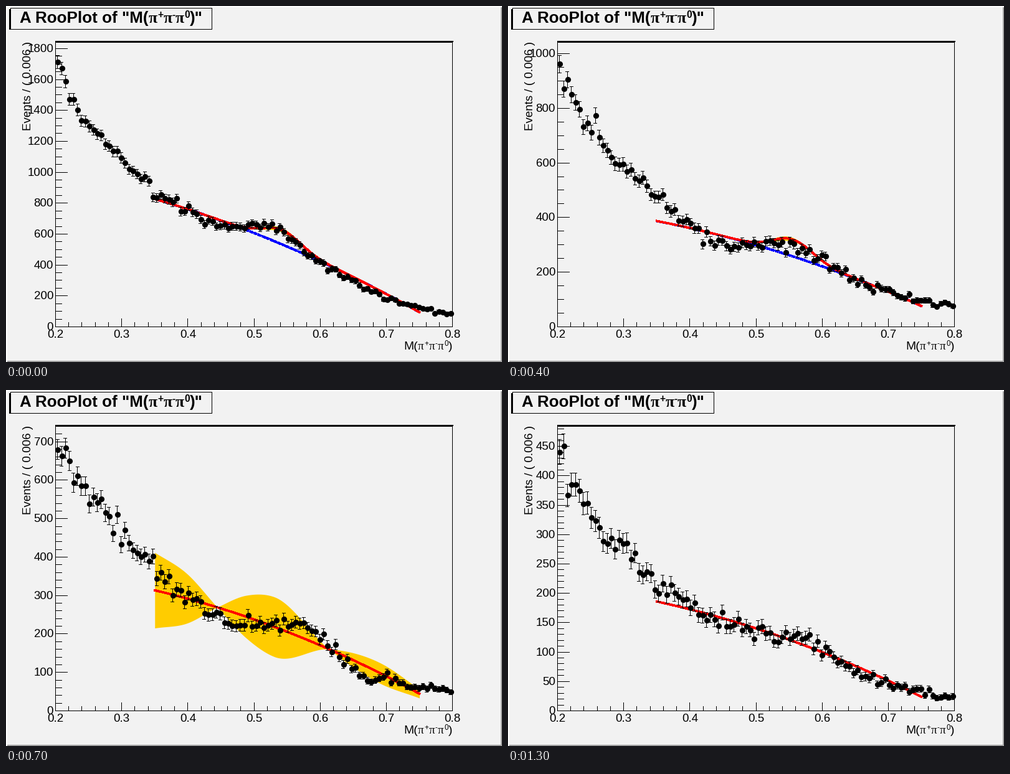
A matplotlib script for the animation above (1600 ms loop, 796 by 572 pixels).

```python
import matplotlib.pyplot as plt
import numpy as np
from matplotlib.animation import FuncAnimation
from matplotlib.patches import Rectangle

W, H, DPI = 796, 572, 128
PX = 72 / DPI
LEFT, RIGHT, TOP, BOTTOM = 79.5, 716.5, 57, 514.5
BG = "#f2f2f2"
FIT_LO, FIT_HI = 0.35, 0.75
BINS = np.arange(100)
KEY_BINS = [0, 5, 12, 22, 35, 45, 55, 65, 75, 85, 99]

fig = plt.figure(figsize=(W / DPI, H / DPI), dpi=DPI, facecolor=BG)
ax = fig.add_axes([0, 0, 1, 1])
ax.set(xlim=(0, W), ylim=(H, 0))
ax.axis("off")


def px(x):
    return LEFT + (x - 0.2) / 0.6 * (RIGHT - LEFT)


def rect(x0, y0, x1, y1, color):
    ax.add_patch(Rectangle((x0, y0), x1 - x0, y1 - y0, fc=color, lw=0,
                           antialiased=False))


def line(x, y, width, color="black", z=2, **kw):
    return ax.plot(x, y, color=color, lw=width * PX, zorder=z,
                   antialiased=False, **kw)[0]


def hair(x, y):
    """One-pixel line; the half pixel offsets the renderer's snapping."""
    return line(np.array(x) - 0.5, np.array(y) + 0.5, 1)


def box(x0, y0, x1, y1):
    hair([x0, x1, x1, x0, x0], [y0, y0, y1, y1, y0])


def label(x, y, s, size=18.8, font="Liberation Sans", **kw):
    return ax.text(x, y, s, fontsize=size * PX, family=font, va="baseline",
                   zorder=3, **kw)


def formula(x, y, size, weight="normal"):
    """Write the three pi symbols with their charges; return the end x."""
    for charge, adv in (("+", 0.584), ("-", 0.333), ("0", 0.556)):
        label(x, y, "π", size, "Liberation Serif", weight=weight)
        x += 0.549 * size
        label(x, y - 0.32 * size, charge, 0.6 * size, weight=weight)
        x += adv * 0.6 * size
    return x


def smooth(x, xs, ys):
    """Cubic Hermite curve through a few key points."""
    xs, ys = np.array(xs, float), np.array(ys, float)
    m = np.gradient(ys, xs)
    j = np.clip(np.searchsorted(xs, x) - 1, 0, len(xs) - 2)
    h = xs[j + 1] - xs[j]
    t = (x - xs[j]) / h
    return ((1 + 2 * t) * (1 - t) ** 2 * ys[j] + t * (1 - t) ** 2 * h * m[j]
            + t * t * (3 - 2 * t) * ys[j + 1] + t * t * (t - 1) * h * m[j + 1])


def draw_stage():
    rect(0, 0, W, 2, "white")
    rect(0, 0, 2, H, "white")
    rect(W - 2, 2, W, H, "#a0a0a0")
    rect(2, H - 2, W, H, "#a0a0a0")

    rect(5, 5, 327, 38, "black")
    rect(7, 2, 331, 37, BG)
    box(7.5, 2.5, 330.5, 36.5)
    label(22, 27, 'A RooPlot of "M(', 26, weight="bold")
    end = formula(229, 27, 26, "bold")
    label(end, 27, ')"', 26, weight="bold")

    box(LEFT, TOP, RIGHT, BOTTOM)
    line([LEFT, RIGHT], [TOP, TOP], 2)
    for i in range(31):
        x = px(0.2 + 0.02 * i)
        hair([x, x], [BOTTOM, BOTTOM - (7 if i % 5 else 13.5)])
        if i % 5 == 0:
            label(x, 533, f"{0.2 + 0.02 * i:.1f}", ha="center")

    label(40, 200, "Events / ( 0.006 )", rotation=90, rotation_mode="anchor")
    label(638.5, 552, "M(", 19.3)
    end = formula(638.5 + 1.166 * 19.3, 552, 19.3)
    label(end, 552, ")", 19.3)


def draw_counts(step, sub, top, py):
    art = []
    for j in range(int(top * sub / step) + 1):
        v = j * step / sub
        major = j % sub == 0
        art.append(hair([LEFT, LEFT + (19 if major else 9.5)], [py(v)] * 2))
        if major:
            art.append(label(76, py(v) + 6.5, f"{v:.0f}", ha="right"))
    return art


def draw_fit(py, bkg, peak, band):
    art = []
    t = np.linspace(0, 1, 260)
    x = px(FIT_LO + (FIT_HI - FIT_LO) * t)
    base = bkg[0] - bkg[1] * t - bkg[2] * t * t
    total = base
    if peak:
        height, mid, sigma = peak
        total = base + height * np.exp(-((x - mid) / sigma) ** 2 / 2)
        art.append(line(x, py(base), 2.6, "blue", 3.5, dashes=(2, 0.6),
                        dash_capstyle="butt"))
    if band:
        w = smooth(x, *zip(*band))
        art.append(ax.fill_between(x, py(total) - w, py(total) + w,
                                   color="#ffcc00", lw=0, zorder=2.5,
                                   antialiased=False))
    art.append(line(x, py(total), 2.8, "red", 4))
    return art


def draw_data(py, n, root):
    x = px(0.203 + 0.006 * BINS)
    hi, lo = py(n + root + 0.5) + 0.5, py(n - root + 0.5) + 0.5
    style = dict(color="black", lw=PX, zorder=5, antialiased=False)
    art = [ax.vlines(x - 0.5, hi, lo, **style)]
    art += [ax.hlines(y, x - 3, x + 2, **style) for y in (hi, lo)]
    dots = line(np.floor(x) + 0.5, np.floor(py(n)) + 0.5, 0, z=6, ls="",
                marker="o", ms=9.2 * PX, mew=0)
    dots.set_snap(False)
    return art + [dots]


def scene(seed, step, sub, counts, bkg, peak=None, band=None):
    """Build one histogram with its fit.

    counts: mean events at KEY_BINS; bkg: quadratic background;
    peak: signal height, centre and width; band: (x, half width) points of
    the error band, which changes sign where its edges cross.
    """
    rng = np.random.default_rng(seed)
    mean = smooth(BINS, KEY_BINS, counts)
    n = np.round(mean + 0.75 * np.sqrt(mean) * rng.normal(size=len(BINS)))
    n[0] = counts[0]
    root = np.sqrt(n + 0.25)
    top = 1.05 * (n[0] + root[0] + 0.5)

    def py(v):
        return BOTTOM - v * (BOTTOM - TOP) / top

    return (draw_counts(step, sub, top, py) + draw_fit(py, bkg, peak, band)
            + draw_data(py, n, root))


draw_stage()
scenes = [
    scene(1, 200, 4,
          [1712, 1390, 1200, 940, 715, 648, 640, 435, 285, 165, 83],
          (823, 499, 233), (93, 443, 30),
          [(238, 1), (400, 1.5), (440, 3.5), (480, 1.5), (664, 1)]),
    scene(2, 200, 4,
          [1257, 1045, 865, 662, 490, 437, 437, 350, 230, 160, 100],
          (537, 257, 172), (44.5, 462, 62),
          [(238, 1), (400, 2), (430, 4), (458, 11), (495, 3), (664, 1)]),
    scene(3, 200, 4,
          [961, 800, 650, 505, 350, 290, 308, 260, 166, 118, 75],
          (385, 189, 122), (61.5, 457, 32),
          [(238, 1), (410, 1.5), (447, 3.5), (480, 1.5), (664, 1)]),
    scene(4, 100, 5,
          [679, 610, 510, 400, 278, 227, 225, 203, 103, 78, 48],
          (312, 162, 107), None,
          [(238, 61), (290, 40), (339, 0), (385, -34), (430, -48), (518, 0),
           (600, 16.5), (664, 7)]),
    scene(5, 100, 5,
          [559, 458, 400, 302, 213, 180, 180, 160, 90, 55, 30],
          (243, 127, 86), None,
          [(238, 71), (300, 47), (362, 0), (400, -39), (440, -56), (541, 0),
           (610, 15.5), (664, 9)]),
    scene(6, 50, 5,
          [440, 355, 295, 235, 168, 140, 130, 112, 66, 42, 22],
          (185, 98, 64)),
]


def update(i):
    # the first plot shows for one tick, the others for three
    current = (i + 2) // 3
    for j, art in enumerate(scenes):
        for a in art:
            a.set_visible(j == current)
    return []


anim = FuncAnimation(fig, update, frames=16, interval=100, repeat=True,
                     repeat_delay=0, blit=False)
plt.show()
```
